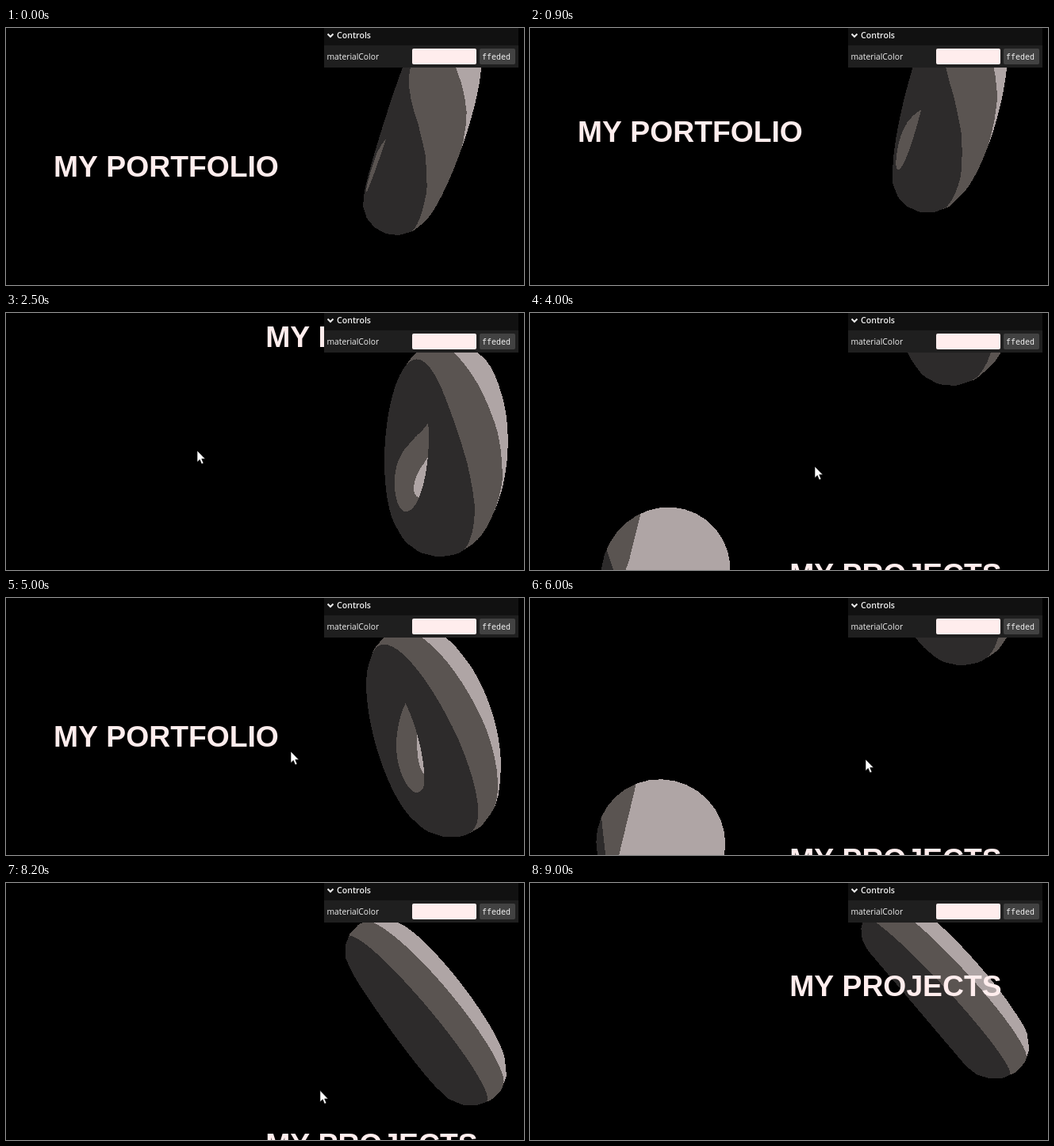
These frames come from a looping animation (653x325 px, 9100 ms). An HTML page with a canvas:

```html
<!DOCTYPE html>
<html lang="en">
<head>
<meta charset="utf-8">
<title>Portfolio</title>
<style>
  html, body { margin: 0; width: 100%; height: 100%; overflow: hidden; background: #000; }
  #stage { position: relative; width: 653px; height: 325px; overflow: hidden; background: #000; }
  canvas, svg { position: absolute; left: 0; top: 0; display: block; }
  .title { font: bold 37.3px "Liberation Sans", Arial, sans-serif; font-kerning: none; fill: #ffeded; }
  .label { font-family: "Open Sans", "Noto Sans", sans-serif; fill: #f0f0f0; }
  .hex { font: 10px "DejaVu Sans Mono", monospace; fill: #f0f0f0; }
</style>
</head>
<body>
<div id="stage">
  <canvas id="scene" width="653" height="325"></canvas>
  <svg width="653" height="325" viewBox="0 0 653 325">
    <g id="page" class="title">
      <text x="60" y="188">MY PORTFOLIO</text>
      <text x="594.6" y="542.5" text-anchor="end">MY PROJECTS</text>
    </g>
    <g id="panel">
      <rect x="401" y="0" width="245" height="50" fill="#1f1f1f"/>
      <rect x="401" y="0" width="245" height="22" fill="#111"/>
      <path d="M405.5 7.5 l3.5 3.5 3.5 -3.5" fill="none" stroke="#ebebeb" stroke-width="2"/>
      <text class="label" x="417" y="13" font-size="10.6" font-weight="600">Controls</text>
      <text class="label" x="404.5" y="40" font-size="10.3">materialColor</text>
      <rect x="512" y="26" width="81" height="20" rx="2" fill="#ffeded"/>
      <rect x="597" y="26" width="45" height="20" rx="2" fill="#424242"/>
      <text class="hex" x="600" y="40">ffeded</text>
    </g>
    <path id="cursor" d="M0 0 V14.5 L3.3 11.4 5.6 17 8 16 5.7 10.6 H10.2 Z" fill="#fff" stroke="#000" stroke-width=".6"/>
  </svg>
</div>
<script>
const W = 653, H = 325, LOOP = 9100, STEP = 100;
const CX = 327, CY = 175, UNIT = 95, EYE = 6;
const SECTION = 360, SPACING = 4, DRIFT = .00128;
const AGE = 10.2, SPIN_X = .1, SPIN_Y = .12;
const TONES = [[45, 43, 43], [90, 84, 81], [175, 165, 165]];

// Moves: start in seconds, then the values eased to.
const SCROLL = [[0, 0, 0], [.78, 300, 300], [2, 500, 0], [3.3, 200, 200],
  [4.2, 0, 0], [5.4, 200, 200], [6.1, 200, 0], [8.4, 400, 0]];
const POINTER = [[0, 430, 500], [.5, 395, 184], [1.6, 241, 174], [3, 359, 194],
  [5, 423, 204], [6.5, 391, 228], [8, 430, 500]];

const ctx = document.getElementById("scene").getContext("2d");
const page = document.getElementById("page"), cursor = document.getElementById("cursor");
const image = ctx.createImageData(W, H);
const depth = new Float32Array(W * H);

const smooth = f => f * f * (3 - 2 * f);

function follow(moves, t, length) {
  const i = moves.findLastIndex(m => m[0] <= t);
  const to = moves[i], from = moves[Math.max(0, i - 1)];
  const f = smooth(Math.min(1, (t - to[0]) / length));
  return to.slice(1).map((v, n) => from[n + 1] + (v - from[n + 1]) * f);
}

// Turn about y, then about x.
function turner(ax, ay) {
  const cx = Math.cos(ax), sx = Math.sin(ax), cy = Math.cos(ay), sy = Math.sin(ay);
  return ([x, y, z]) => {
    const d = z * cy - x * sy;
    return [x * cy + z * sy, y * cx - d * sx, y * sx + d * cx];
  };
}

// Screen position, nearness and light (from the upper right) of one surface point.
function vertex([x, y, z], n) {
  const k = UNIT * EYE / (EYE - z);
  return [CX + k * x, CY - k * y, k, (n[0] + n[1]) * Math.SQRT1_2];
}

function triangle(a, b, c) {
  const area = (b[0] - a[0]) * (c[1] - a[1]) - (b[1] - a[1]) * (c[0] - a[0]);
  if (!area) return;
  const x0 = Math.max(0, Math.floor(Math.min(a[0], b[0], c[0])));
  const x1 = Math.min(W - 1, Math.ceil(Math.max(a[0], b[0], c[0])));
  const y0 = Math.max(0, Math.floor(Math.min(a[1], b[1], c[1])));
  const y1 = Math.min(H - 1, Math.ceil(Math.max(a[1], b[1], c[1])));
  for (let y = y0; y <= y1; y++) for (let x = x0; x <= x1; x++) {
    const px = x + .5, py = y + .5;
    const u = ((px - a[0]) * (c[1] - a[1]) - (py - a[1]) * (c[0] - a[0])) / area;
    const v = ((b[0] - a[0]) * (py - a[1]) - (b[1] - a[1]) * (px - a[0])) / area;
    const w = 1 - u - v;
    if (u < 0 || v < 0 || w < 0) continue;
    const k = w * a[2] + u * b[2] + v * c[2], i = y * W + x;
    if (k <= depth[i]) continue;
    depth[i] = k;
    const lit = w * a[3] + u * b[3] + v * c[3];
    image.data.set(TONES[lit < -1 / 3 ? 0 : lit < 1 / 3 ? 1 : 2], i * 4);
    image.data[i * 4 + 3] = 255;
  }
}

// surface(p, q) gives a point and its normal for two angles.
function solid(centre, turn, rows, cols, surface) {
  const grid = (i, j) => {
    const [p, n] = surface(i / rows * 2 * Math.PI, j / cols * 2 * Math.PI);
    return vertex(turn(p).map((c, m) => c + centre[m]), turn(n));
  };
  const points = Array.from({ length: rows + 1 }, (_, i) =>
    Array.from({ length: cols + 1 }, (_, j) => grid(i, j)));
  for (let i = 0; i < rows; i++) for (let j = 0; j < cols; j++) {
    const a = points[i][j], c = points[i + 1][j + 1];
    triangle(a, points[i + 1][j], c);
    triangle(a, c, points[i][j + 1]);
  }
}

function torus(p, q) {
  const c = Math.cos(p), s = Math.sin(p), r = 1 + .4 * c;
  return [[r * Math.cos(q), r * Math.sin(q), .4 * s], [c * Math.cos(q), c * Math.sin(q), s]];
}

function cone(p, q) {
  const f = p / (2 * Math.PI), s = Math.sin(q), c = Math.cos(q), l = Math.sqrt(5);
  return [[(1 - f) * s, 2 * f - 1, (1 - f) * c], [2 * s / l, 1 / l, 2 * c / l]];
}

function draw(t) {
  const [scroll, view] = follow(SCROLL, t, .5);
  const [mx, my] = follow(POINTER, t, .9);
  const camX = (mx - 430) * DRIFT;
  const camY = (150 - my) * DRIFT - view / SECTION * SPACING;
  const turn = turner((AGE + t) * SPIN_X, (AGE + t) * SPIN_Y);

  image.data.fill(0);
  depth.fill(0);
  solid([2 - camX, -camY, 0], turn, 16, 60, torus);
  solid([-2 - camX, -SPACING - camY, 0], turn, 1, 32, cone);
  ctx.putImageData(image, 0, 0);
  page.setAttribute("transform", `translate(0 ${-scroll})`);
  cursor.setAttribute("transform", `translate(${mx} ${my})`);
}

const start = performance.now();
let shown = -1;
function tick() {
  const step = Math.floor((performance.now() - start) % LOOP / STEP);
  if (step !== shown) draw(step * STEP / 1000);
  shown = step;
  requestAnimationFrame(tick);
}
tick();
</script>
</body>
</html>
```
